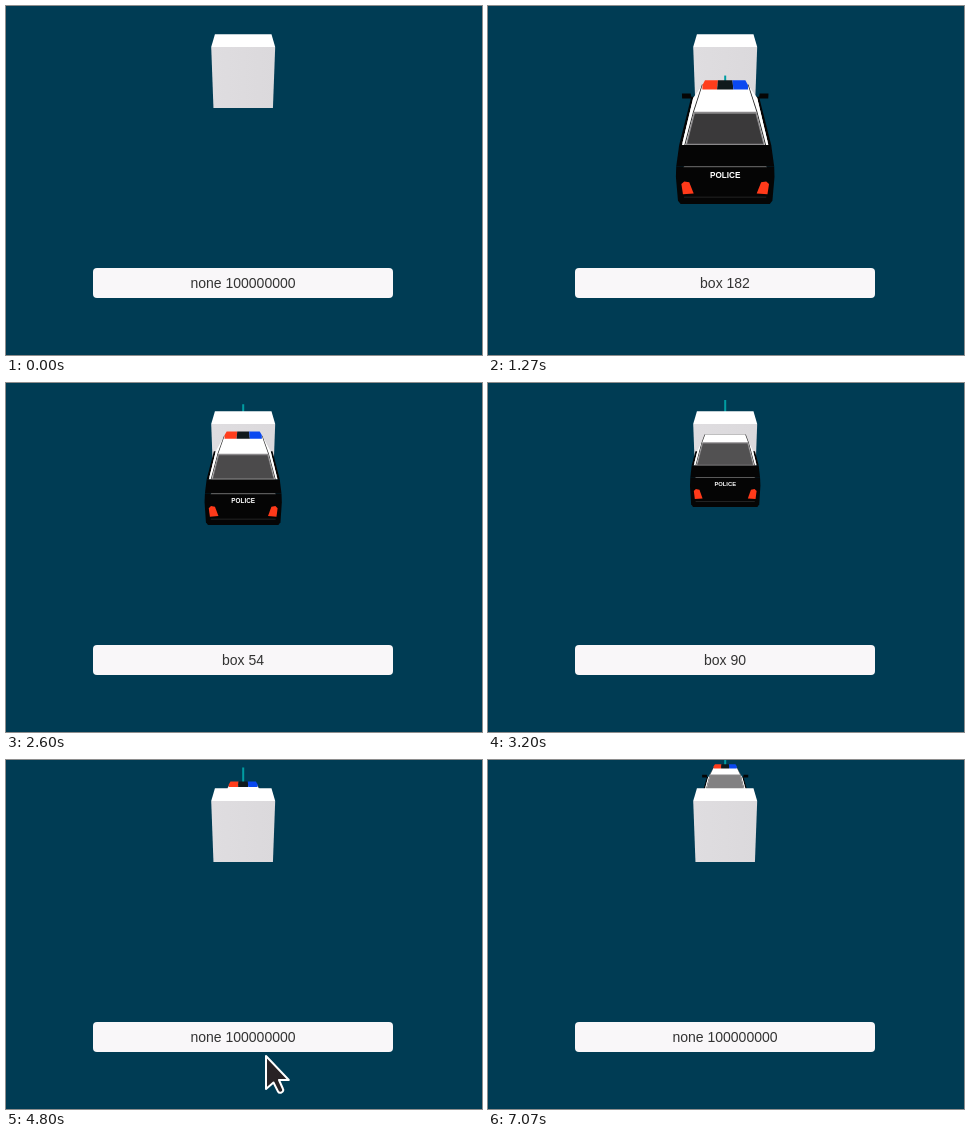
An HTML page with a canvas for the animation above (7.14 s loop, 476 by 349 pixels).

```html
<!DOCTYPE html>
<html lang="en">
<head>
<meta charset="utf-8">
<style>
html, body { margin: 0; width: 100%; height: 100%; overflow: hidden; background: #003c54; }
canvas { position: absolute; left: 0; top: 0; }
#label {
  position: absolute; left: 87px; top: 262px; width: 300px; height: 30px;
  border-radius: 4px; background: #f9f7f9; color: #333;
  font: 14px/30px "Liberation Sans", Arial, sans-serif; text-align: center;
}
</style>
</head>
<body>
<div id="label">none 100000000</div>
<canvas id="stage" width="476" height="349"></canvas>
<script>
const LOOP = 7140, TICK = 200 / 3, SPAWN = 530, START = 730, BOX = 100;
const ctx = document.getElementById('stage').getContext('2d');
const label = document.getElementById('label');

// Camera 30 degrees down; z = 0 is the front face of the box.
const FOCAL = 421, SIN = 0.5, COS = 0.866;
function project([x, y, z]) {
  const s = FOCAL / (708 - SIN * y + COS * z);
  return [237.2 + x * s, 174.5 - (122 + COS * y + SIN * z) * s, s];
}

// Keeps the part of a polygon for which side * (z - plane) > 0.
function clip(pts, plane, side) {
  const out = [];
  pts.forEach((a, i) => {
    const b = pts[(i + 1) % pts.length];
    const da = side * (a[2] - plane), db = side * (b[2] - plane);
    if (da >= 0) out.push(a);
    if (da * db < 0) out.push(a.map((c, k) => c + (b[k] - c) * da / (da - db)));
  });
  return out;
}

function trace(pts) {
  ctx.beginPath();
  pts.forEach(p => ctx.lineTo(...project(p)));
}

function fill(color, pts) {
  if (pts.length < 3) return;
  trace(pts);
  ctx.closePath();
  ctx.fillStyle = color;
  ctx.fill();
}

const flip = pts => pts.map(([x, y, v]) => [-x, y, v]);
const both = (color, half) => [color, half.concat(flip(half).reverse())];
const pair = (color, pts) => [[color, pts], [color, flip(pts)]];

// Points are [x, height, distance ahead of the rear bumper].
const lower = [
  both('#050505', [[49, 57, 43], [47, 57, 200]]),
  both('#fff', [[46, 57, 43], [44, 57, 195]]),
  ...pair('#050505', [[46, 57, 192], [59, 57, 192], [59, 64, 192], [47, 64, 192]])
];
const upper = [
  ...pair('#fff', [[46, 57, 43], [34, 84, 70], [29, 84, 168], [44, 57, 195]]),
  both('#222', [[43.5, 57, 43], [35, 84, 70], [30, 84, 168]]),
  both('#fff', [[42.5, 57, 43], [34, 84, 70], [29, 84, 169]]),
  ['#ff3d1c', [[-28, 87, 138], [-28, 91, 144], [-25, 95, 150], [-9, 95, 150], [-10, 87, 138]]],
  ['#10191c', [[-10, 87, 138], [-9, 95, 150], [9, 95, 150], [10, 87, 138]]],
  ['#0a48f0', [[28, 87, 138], [28, 91, 144], [25, 95, 150], [9, 95, 150], [10, 87, 138]]],
  both('#8b898b', [[42, 57, 43], [34, 84, 70]])
];
const rear = [
  both('#050505', [[48, 54, 0], [49, 57, 43]]),
  both('#050505', [[48, 54, 0], [49, 42, 0], [48.5, 14, 0], [46, 10, 0]]),
  both('#5a5a5a', [[40, 54.5, 0], [41, 53, 0]]),
  both('#2c2c2c', [[42, 19, 0], [42, 18, 0]]),
  ...pair('#ff3a1a', [[44, 34, 0], [41, 37, 0], [36, 36, 0], [32, 23, 0], [43, 22, 0]])
];

function drawCar(z, t, plane, side) {
  const place = pts => clip(pts.map(([x, y, v]) => [x, y, v + z]), plane, side);
  const paint = parts => parts.forEach(([color, pts]) => fill(color, place(pts)));

  paint(lower);
  const ray = place([[0, 55, 128], [0, 55, 598]]);
  if (ray.length > 1) {
    trace(ray);
    ctx.strokeStyle = '#009da2';
    ctx.lineWidth = 2;
    ctx.stroke();
  }
  paint(upper);
  const g = Math.round(58 + (t - 1270) / 80);
  paint([both(`rgb(${g},${g - 1},${g})`, [[40.5, 58, 44], [33, 82.5, 68.5]])]);
  paint(rear);

  if (side * (z - plane) > 0) {
    const [x, y, s] = project([0, 44, z]);
    ctx.font = `bold ${8.1 * s}px "Liberation Sans", Arial, sans-serif`;
    ctx.textAlign = 'center';
    ctx.textBaseline = 'alphabetic';
    ctx.fillStyle = '#fff';
    ctx.fillText('POLICE', x, y + 2.9 * s);
  }
}

function drawBox() {
  const h = BOX / 2;
  fill('#fff', [[-h, BOX, 0], [h, BOX, 0], [h, BOX, BOX], [-h, BOX, BOX]]);
  const shade = ctx.createLinearGradient(205, 0, 269, 0);
  shade.addColorStop(0, '#dfdde0');
  shade.addColorStop(1, '#dbd9dc');
  fill(shade, [[-h, BOX, 0], [h, BOX, 0], [h, 0, 0], [-h, 0, 0]]);
}

// [time, x, y] of the pointer tip
const pointer = [
  [3867, 301, 300], [4066, 255, 303], [4333, 259, 295], [5066, 259, 295],
  [5333, 261, 304], [5533, 222, 252], [5733, 131, 107], [5800, 85, 28]
];
const arrow = new Path2D('M1 1V34L8.5 27.5L13 36.5Q14 38.5 16.5 37.5Q19 36 18 34L14 25H23.8Z');

function drawPointer(t) {
  const i = pointer.findIndex(p => p[0] >= t - 1);
  if (i < 0 || t < pointer[0][0] - 1) return;
  const b = pointer[i], a = pointer[Math.max(0, i - 1)];
  const k = b === a ? 1 : Math.min(1, (t - a[0]) / (b[0] - a[0]));
  ctx.save();
  ctx.translate(a[1] + (b[1] - a[1]) * k, a[2] + (b[2] - a[2]) * k);
  ctx.lineWidth = 2;
  ctx.lineJoin = 'round';
  ctx.strokeStyle = '#fff';
  ctx.fillStyle = '#282225';
  ctx.fill(arrow);
  ctx.stroke(arrow);
  ctx.restore();
}

function reading(t) {
  const front = 182 - 0.0963 * (t - 1267);
  const back = 90 - 0.1 * (t - 3200);
  const d = Math.round(front >= 0 ? front : back);
  return t < START || d < 0 ? 'none 100000000' : 'box ' + d;
}

function stepTime(t) {
  let k = Math.floor((t + 3.4) / TICK);
  if (Math.round(k * TICK / 10) * 10 > t) k--;
  return k * TICK;
}

function render(now) {
  const raw = now % LOOP, active = raw >= START;
  const t = active ? stepTime(raw) : raw;
  const z = -310 + 0.1 * (t - 1267);
  ctx.clearRect(0, 0, 476, 349);
  if (active) drawCar(z, t, BOX, 1);
  drawBox();
  if (active) {
    drawCar(z, t, 0, -1);
    drawPointer(t);
  } else if (raw >= SPAWN) {
    ctx.fillStyle = '#050505';
    ctx.fillRect(233, 174, 6, 4);
    ctx.fillStyle = '#fff';
    ctx.fillRect(234, 174, 4, 2);
  }
  const text = reading(active ? t + 0.01 : 0);
  if (label.textContent !== text) label.textContent = text;
}

const began = performance.now();
function frame() {
  render(performance.now() - began);
  requestAnimationFrame(frame);
}
frame();
</script>
</body>
</html>
```
